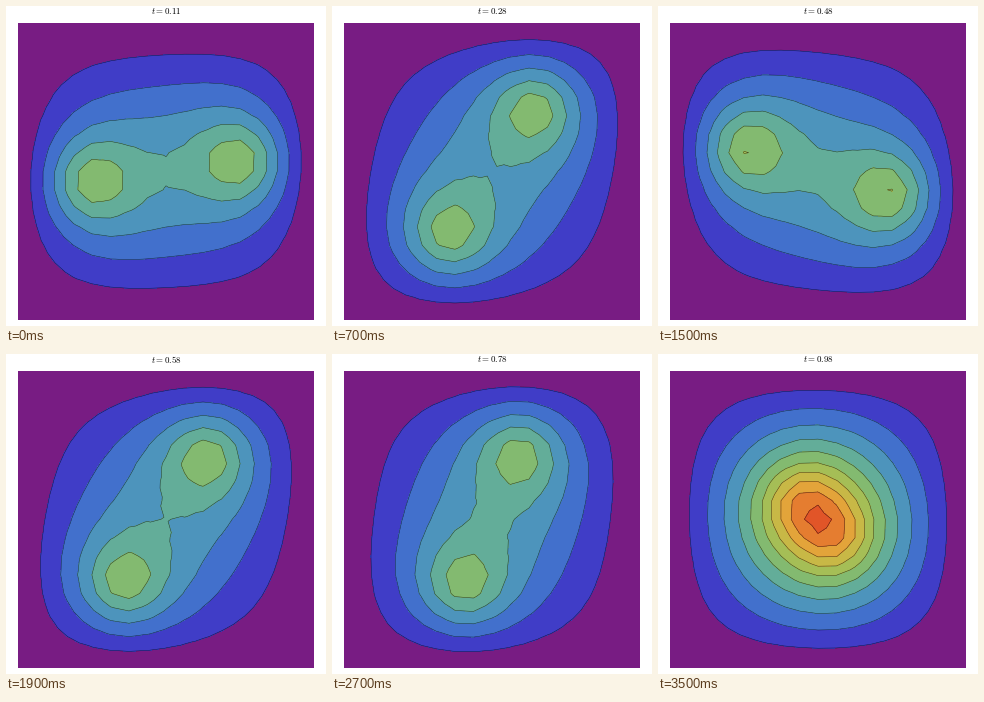
A matplotlib script for the animation above (3600 ms loop, 320 by 320 pixels).

```python
import numpy as np
import matplotlib.pyplot as plt
from matplotlib.animation import FuncAnimation
from matplotlib.tri import Triangulation

SIZE, DPI = 320, 100
FRAMES, INTERVAL = 36, 100
N = 16            # grid cells per side
HALF = N / 2
SIGMA = 1.0       # source width in cells
RADIUS = 4.1      # initial orbit radius in cells
RIPPLE = 0.035    # change of source strength between nodes and cell centres
STEP = 0.18       # spacing of the contour levels

COLORS = ["#781c83", "#403dc7", "#4270cc", "#4d94bc", "#63ad99", "#83ba70",
          "#a5be56", "#c8b846", "#e3a43a", "#e57d30", "#e15528"]
LEVELS = np.arange(1, len(COLORS))

plt.rcParams["mathtext.fontset"] = "cm"

axis = np.arange(N + 1) - HALF
X, Y = np.meshgrid(axis, axis)
mid = axis[:-1] + 0.5
CX, CY = np.meshgrid(mid, mid)

# Sine basis that diagonalises the five-point Laplacian
k = np.arange(1, N)
SINE = np.sin(np.pi * np.outer(k, k) / N)
EIG = 2 - 2 * np.cos(np.pi * k / N)
EIG = EIG[:, None] + EIG[None, :]


def crossed_mesh():
    """Split every grid cell into four triangles around its centre."""
    j, i = np.mgrid[0:N, 0:N]
    a = (j * (N + 1) + i).ravel()
    b, c, d = a + 1, a + N + 2, a + N + 1
    m = (N + 1) ** 2 + np.arange(N * N)
    sides = [(a, b), (b, c), (c, d), (d, a)]
    tris = np.vstack([np.column_stack([p, q, m]) for p, q in sides])
    return Triangulation(np.append(X, CX), np.append(Y, CY), tris)


def source(x0, y0):
    """Gaussian bump, a little stronger when it sits on a grid node."""
    r2 = (X - x0) ** 2 + (Y - y0) ** 2
    ripple = np.cos(2 * np.pi * x0) + np.cos(2 * np.pi * y0)
    strength = (1 + RIPPLE * ripple) / (2 * SIGMA ** 2)
    return strength * np.exp(-r2 / (2 * SIGMA ** 2))


def solve(t):
    """Poisson problem for two sources spiralling into the centre."""
    s = 0.986 * t
    phi = 4 * np.pi * s ** 2
    r = RADIUS * (1 - s ** 10.5)
    x, y = r * np.cos(phi), r * np.sin(phi)
    f = (source(x, y) + source(-x, -y))[1:-1, 1:-1]
    u = np.zeros((N + 1, N + 1))
    u[1:-1, 1:-1] = SINE @ (SINE @ f @ SINE / EIG) @ SINE * (2 / N) ** 2
    return u / STEP


fig = plt.figure(figsize=(SIZE / DPI, SIZE / DPI), dpi=DPI, facecolor="white")
ax = fig.add_axes([12 / SIZE, 6.5 / SIZE, 296 / SIZE, 296.5 / SIZE])
ax.set(xlim=(-HALF, HALF), ylim=(-HALF, HALF))
ax.autoscale(False)
ax.axis("off")

title = fig.text(0.5, 1 - 5.2 / SIZE, "", fontsize=6.4,
                 ha="center", va="center")
mesh = crossed_mesh()
drawn = []


def update(n):
    while drawn:
        drawn.pop().remove()
    t = 0.106 + 0.025 * n
    u = solve(t)
    centres = (u[:-1, :-1] + u[1:, :-1] + u[:-1, 1:] + u[1:, 1:]) / 4
    z = np.append(u, centres)
    drawn.append(ax.tricontourf(mesh, z, levels=[-1, *LEVELS, 20],
                                colors=COLORS))
    drawn.append(ax.tricontour(mesh, z, levels=LEVELS, colors="black",
                               linewidths=0.36, alpha=0.7))
    title.set_text(f"$t = {t:.2f}$")
    return [title]


anim = FuncAnimation(fig, update, frames=FRAMES, interval=INTERVAL,
                     init_func=lambda: update(0), repeat=True, blit=False)
plt.show()
```
